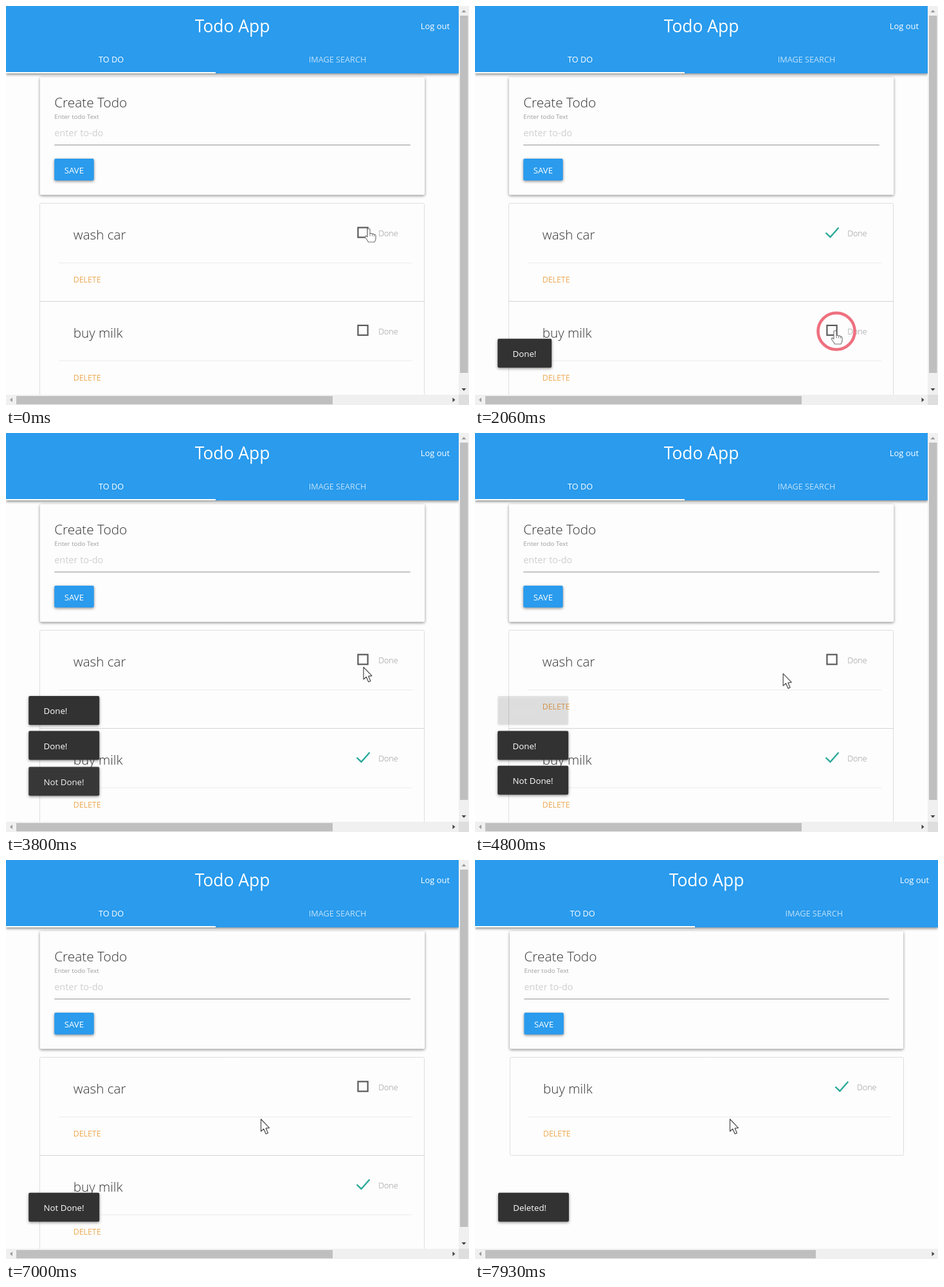
Recreate the animation shown at these times as an HTML page with a canvas. Size 720x622 px, loop 8 s.

```html
<!DOCTYPE html>
<html lang="en">
<head>
<meta charset="utf-8">
<title>Todo App</title>
<style>
html, body { margin: 0; width: 100%; height: 100%; overflow: hidden; background: #fdfdfd; }
canvas { display: block; }
</style>
</head>
<body>
<canvas id="stage" width="720" height="622"></canvas>
<script>
const ctx = document.getElementById('stage').getContext('2d');
const LOOP = 8000, VIEW_H = 606, ROW_H = 152.5;
const DELETED_AT = 7480;
const BLUE = '#2a9bed';

const toasts = [
  { text: 'Done!', start: 540, end: 4680, width: 84 },
  { text: 'Done!', start: 2180, end: 6420, width: 84 },
  { text: 'Not Done!', start: 3615, end: 7560, width: 110 },
  { text: 'Deleted!', start: DELETED_AT, end: 12000, width: 98 }
];
const clicks = [60, 1830, 3020, 6400];
// Cursor tip: time, x, y
const path = [
  [0, 564, 347], [1600, 564, 347], [1820, 560, 506], [2460, 560, 506],
  [2730, 570.5, 440], [3000, 558, 350], [3460, 558, 350], [3760, 556, 365],
  [4600, 556, 365], [5350, 122, 422], [6740, 122, 422], [6990, 396.5, 404], [LOOP, 396.5, 404]
];
const arrow = new Path2D('M0 0V19L4.3 15.2L7.7 23L10.9 21.6L7.6 14.2L13 13.6Z');
const hand = new Path2D('M-2 2Q-2 0 0 0Q2 0 2 2V8Q4 6.4 5.5 8.4Q7.5 7.4 8.4 9.4Q11 9 11 11.5V15Q11 18 9 21H-.5Q-2 18 -5.2 14Q-6 11.4 -4 11.4L-2 13Z');

const clamp = v => Math.max(0, Math.min(1, v));
const ramp = (t, start, length) => clamp((t - start) / length);
const easeOut = p => 1 - (1 - p) ** 3;
const smooth = p => p * p * (3 - 2 * p);

function text(s, x, y, size, color, align = 'left', weight = 400) {
  ctx.font = `${weight} ${size}px "Open Sans", "Noto Sans", sans-serif`;
  ctx.textAlign = align;
  ctx.fillStyle = color;
  ctx.fillText(s, x, y);
}

function box(x, y, w, h, color) {
  ctx.fillStyle = color;
  ctx.fillRect(x, y, w, h);
}

function raised(x, y, w, h, color, r = 2) {
  ctx.save();
  ctx.shadowColor = 'rgba(0,0,0,.45)';
  ctx.shadowBlur = 4;
  ctx.shadowOffsetY = 1.5;
  ctx.fillStyle = color;
  ctx.beginPath();
  ctx.roundRect(x, y, w, h, r);
  ctx.fill();
  ctx.restore();
}

function line(points, color, width) {
  ctx.strokeStyle = color;
  ctx.lineWidth = width;
  ctx.beginPath();
  points.forEach(([x, y]) => ctx.lineTo(x, y));
  ctx.stroke();
}

function cursorAt(t) {
  const i = Math.max(1, path.findIndex(k => k[0] > t));
  const [t0, x0, y0] = path[i - 1], [t1, x1, y1] = path[i];
  const p = smooth(ramp(t, t0, t1 - t0));
  return [x0 + (x1 - x0) * p, y0 + (y1 - y0) * p];
}

function drawHeader(W) {
  raised(0, -5, W, 110, BLUE, 0);
  text('Todo App', W / 2, 41, 26.4, '#fff', 'center');
  text('Log out', W - 14, 35.5, 12.9, '#fff', 'right');
  text('TO DO', 163.5 * W / 704, 88, 12.7, '#fff', 'center');
  text('IMAGE SEARCH', 515.5 * W / 704, 88, 12.7, 'rgba(255,255,255,.7)', 'center');
  box(0, 103, W - 378, 2, '#fff');
}

function drawForm(left, right) {
  raised(left, 111, right - left, 183.5, '#fdfdfd');
  const x = left + 22.4;
  text('Create Todo', x, 158, 20.8, '#333', 'left', 300);
  text('Enter todo Text', x, 176, 9.8, '#9e9e9e');
  text('enter to-do', x, 203, 14.5, '#cfcfcf');
  box(x, 216, right - left - 44.8, 1.3, '#a8a8a8');
  raised(x, 238, 61.5, 34, BLUE);
  text('SAVE', x + 30.7, 261, 13.2, '#fff', 'center');
}

function drawCheck(x, y, done) {
  ctx.globalAlpha = 1 - done;
  ctx.strokeStyle = '#5a5a5a';
  ctx.lineWidth = 2.2;
  ctx.strokeRect(x - 7.6, y - 7.6, 15.2, 15.2);
  ctx.globalAlpha = done;
  line([[x - 9.5, y + .5], [x - 2.5, y + 7.2], [x + 10.5, y - 7.5]], '#2ba99a', 2.4);
  ctx.globalAlpha = 1;
}

function drawItem(left, right, y, label, done, link, linkAlpha = 1) {
  text(label, left + 52, y + 57, 20.6, '#333', 'left', 300);
  drawCheck(right - 96.2, y + 46, done);
  text('Done', right - 72, y + 52, 12.5, '#949494', 'left', 300);
  box(left + 29.5, y + 93, right - left - 49, 1, '#ebebeb');
  ctx.globalAlpha = linkAlpha;
  text('DELETE', left + 52, y + 124, 12.3, link);
  ctx.globalAlpha = 1;
}

function drawList(t, left, right) {
  const single = t >= DELETED_AT, link = '#eea953';
  ctx.strokeStyle = '#dedede';
  ctx.lineWidth = 1;
  ctx.beginPath();
  ctx.roundRect(Math.floor(left) + .5, 307.5, Math.round(right - left), single ? 153 : 306, 2);
  ctx.stroke();
  const milkDone = ramp(t, 2180, 200);
  if (single) return drawItem(left, right, 307, 'buy milk', milkDone, link);

  const hover = ramp(t, 5330, 300) * (1 - ramp(t, 6750, 220));
  const mix = (a, b) => Math.round(a + (b - a) * hover);
  const color = `rgb(${mix(238, 253)},${mix(169, 219)},${mix(83, 171)})`;
  const alpha = t < 3615 || t > 3930 ? 1 : ramp(t, 3830, 100);
  const washDone = ramp(t, 540, 200) * (1 - ramp(t, 3520, 200));
  drawItem(left, right, 307, 'wash car', washDone, color, alpha);
  box(left, 460, right - left, 1, '#d4d4d4');
  drawItem(left, right, 307 + ROW_H, 'buy milk', milkDone, link);
}

function drawToasts(t, W) {
  const live = toasts.filter(o => t >= o.start && t < o.end + 500);
  const width = Math.max(0, ...live.map(o => o.width));
  live.forEach((o, i) => {
    const enter = easeOut(ramp(t, o.start, 300));
    const leave = 1 - 2 ** (-10 * ramp(t, o.end, 375));
    const x = W * .05, y = 518.7 - 54.3 * (live.length - 1 - i) + 35 * (1 - enter);
    ctx.globalAlpha = t >= o.end + 375 ? 0 : enter * (1 - leave);
    raised(x, y, width, 45, '#323232');
    text(o.text, x + 23.3, y + 28.3, 13.3, '#fff');
    ctx.globalAlpha = 1;
  });
}

function triangle(x, y, dx, dy, color) {
  ctx.fillStyle = color;
  ctx.beginPath();
  ctx.moveTo(x + dx * 2, y + dy * 2);
  ctx.lineTo(x - dx * 2 + dy * 3.5, y - dy * 2 + dx * 3.5);
  ctx.lineTo(x - dx * 2 - dy * 3.5, y - dy * 2 - dx * 3.5);
  ctx.fill();
}

function drawScrollbars(W) {
  box(0, VIEW_H, 720, 16, '#f0f0f0');
  box(16, 608, W === 720 ? 514 : 492, 13, '#bfbfbf');
  triangle(8, 614, -1, 0, '#9c9c9c');
  triangle(W - 7.5, 614, 1, 0, '#444');
  if (W === 720) return;
  box(704, 0, 16, VIEW_H, '#f0f0f0');
  box(706, 15, 12.5, 557, '#bfbfbf');
  triangle(712, 8, 0, -1, '#9c9c9c');
  triangle(712, 598, 0, 1, '#444');
  box(704, VIEW_H, 16, 16, '#dedede');
}

function drawPointer(t) {
  const [x, y] = cursorAt(t);
  const near = (top, bottom) => y > top && y < bottom;
  const overCheck = x > 544 && x < 612 && (near(340, 364) || near(493, 517));
  const overLink = x > 104 && x < 148 && near(414, 438);
  for (const start of clicks) {
    const p = ramp(t, start, 380);
    if (p <= 0 || p >= 1) continue;
    ctx.globalAlpha = clamp((1 - p) * 4);
    ctx.strokeStyle = '#ee707f';
    ctx.lineWidth = 4.6;
    ctx.beginPath();
    ctx.arc(x + 2, y + 1, 6 + 24 * easeOut(p), 0, Math.PI * 2);
    ctx.stroke();
    ctx.globalAlpha = 1;
  }
  const onLink = overCheck || overLink;
  const shape = onLink ? hand : arrow;
  ctx.save();
  ctx.translate(x, y);
  ctx.fillStyle = '#fff';
  ctx.strokeStyle = onLink ? '#777' : '#4a4a4a';
  ctx.lineWidth = 1.2;
  ctx.lineJoin = 'round';
  ctx.fill(shape);
  ctx.stroke(shape);
  if (onLink) {
    line([[2, 8], [2, 12]], '#888', 1);
    line([[5.5, 8.5], [5.5, 12]], '#888', 1);
    line([[8.4, 9.5], [8.4, 12.5]], '#888', 1);
  }
  ctx.restore();
}

function draw(now) {
  const t = now % LOOP;
  const W = t >= DELETED_AT ? 720 : 704;
  const left = W * .075, right = W * .925;
  box(0, 0, 720, 622, '#fdfdfd');
  drawForm(left, right);
  drawList(t, left, right);
  drawHeader(W);
  drawToasts(t, W);
  drawScrollbars(W);
  drawPointer(t);
}

const origin = performance.now();
function tick() {
  draw(performance.now() - origin);
  requestAnimationFrame(tick);
}
tick();
</script>
</body>
</html>
```
